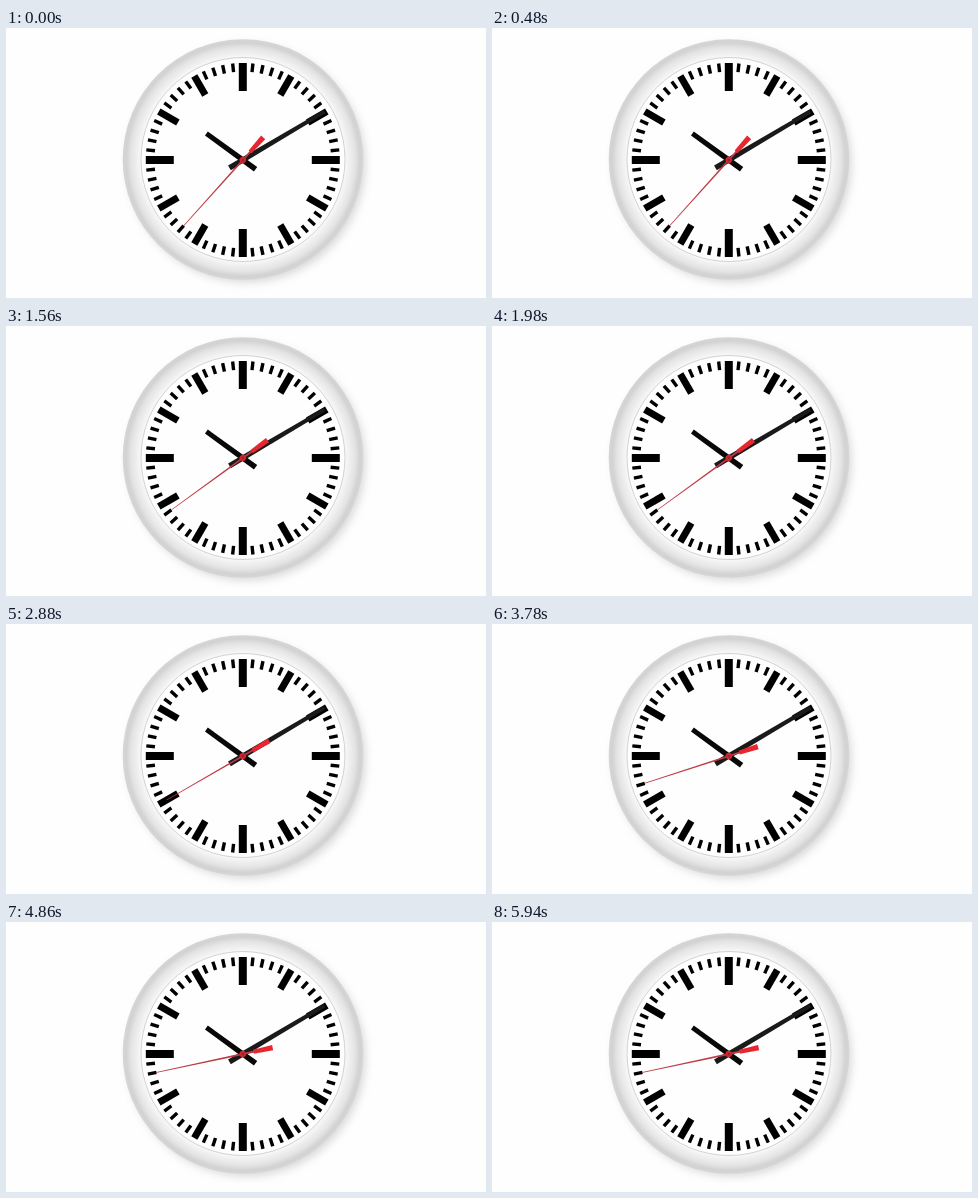
Recreate the animation shown at these times as an HTML page. Size 480 px wide and 270 px high, loop 6 s.

```html
<!DOCTYPE html>
<html lang="en">
<head>
<meta charset="utf-8">
<title>Clock</title>
<style>
  html, body { margin: 0; width: 100%; height: 100%; overflow: hidden; background: #fdfefd; }
  svg { display: block; width: 100vw; height: 100vh; }
</style>
</head>
<body>
<svg viewBox="0 0 480 270">
  <defs>
    <radialGradient id="rim" gradientUnits="userSpaceOnUse" cx="237" cy="131.5" r="120.5">
      <stop offset=".84" stop-color="#fafafa"/>
      <stop offset=".88" stop-color="#f0f0f0"/>
      <stop offset=".93" stop-color="#e4e4e4"/>
      <stop offset=".97" stop-color="#d2d2d2"/>
      <stop offset="1" stop-color="#d6d6d6"/>
    </radialGradient>
    <filter id="blur" x="-20%" y="-20%" width="140%" height="140%">
      <feGaussianBlur stdDeviation="4"/>
    </filter>
  </defs>
  <rect width="480" height="270" fill="#fdfefd"/>
  <circle cx="240.5" cy="135.5" r="119" fill="#b4b4b4" opacity=".5" filter="url(#blur)"/>
  <circle cx="237" cy="131.5" r="120.3" fill="url(#rim)"/>
  <circle cx="237" cy="131.5" r="102" fill="#fdfefd" stroke="#d2d2d2" stroke-width="1"/>
  <g transform="translate(236.8 132)">
    <g id="marks" fill="#000"></g>
    <path d="M-2.8 15.8 L-2.4 -45 H2.4 L2.8 15.8 Z" fill="#080808" transform="rotate(306)"/>
    <path d="M-2.7 15.5 L-1.9 -95 H1.9 L2.7 15.5 Z" fill="#1a1a1a" transform="rotate(59.4)"/>
    <g id="second" fill="#e8262f">
      <path d="M-.9 12 L-.35 -88 H.35 L.9 12 Z" fill="#bf3a45"/>
      <path d="M-2 11 L-2.7 30.5 H2.7 L2 11 Z"/>
      <circle r="3.2" fill="#d0242e"/>
      <circle r="1.2" fill="#8a2a30"/>
    </g>
  </g>
</svg>
<script>
  const LOOP = 6000, FIRST_TICK = 780, TICK = 735;
  const START = 37, STEPS = 6;
  const marks = document.getElementById('marks');
  const second = document.getElementById('second');

  function addMark(minute) {
    const [inner, width] = minute % 15 === 0 ? [69, 8] : minute % 5 === 0 ? [75, 7] : [88.3, 3.4];
    const mark = document.createElementNS('http://www.w3.org/2000/svg', 'rect');
    const attrs = {
      x: -width / 2, y: -97, width, height: 97 - inner,
      transform: `rotate(${minute * 6})`
    };
    for (const key in attrs) mark.setAttribute(key, attrs[key]);
    marks.append(mark);
  }

  function draw(t) {
    const ticks = Math.floor((t - FIRST_TICK) / TICK) + 1;
    const sec = START + Math.min(STEPS, Math.max(0, ticks));
    second.setAttribute('transform', `rotate(${sec * 6})`);
  }

  for (let m = 0; m < 60; m++) addMark(m);

  const begin = performance.now();
  function frame() {
    draw((performance.now() - begin) % LOOP);
    requestAnimationFrame(frame);
  }
  draw(0);
  requestAnimationFrame(frame);
</script>
</body>
</html>
```
